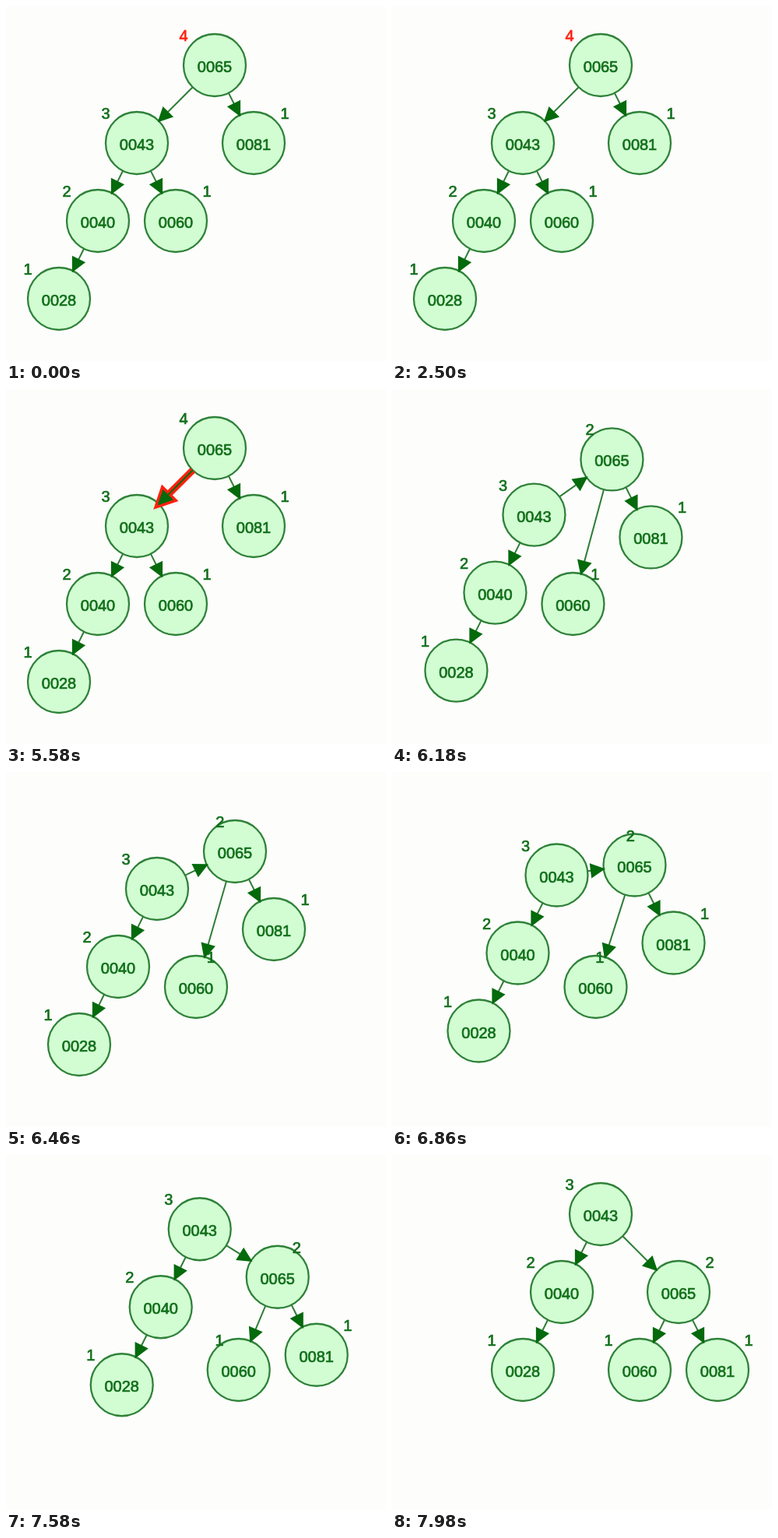
Write an HTML page with a canvas that moves like this. It is 488x456 px and loops after 8000 ms.

```html
<!DOCTYPE html>
<html lang="en">
<head>
<meta charset="utf-8">
<title>Tree rotation</title>
<style>
html, body { margin: 0; width: 100%; height: 100%; overflow: hidden; background: #fdfdfc; }
canvas { display: block; }
</style>
</head>
<body>
<canvas id="stage" width="488" height="456"></canvas>
<script>
const ctx = document.getElementById("stage").getContext("2d");
const LOOP = 8000, RADIUS = 40;
const PAPER = "#fdfdfc", FILL = "#d2fdd3", RING = "#2f8238", LINE = "#2f7d36", DARK = "#046a0c", INK = "#126f1a", RED = "#ff2010";
const HIGHLIGHT = 57, ROTATE = 126;

// side: -1 puts the height label on the left, 1 on the right (before and after the move)
const nodes = {
  65: { from: [268, 76], to: [368, 176], side: [-1, 1], height: 4 },
  43: { from: [168, 176], to: [268, 76], side: [-1, -1], height: 3 },
  81: { from: [318, 176], to: [418, 276], side: [1, 1], height: 1 },
  40: { from: [118, 276], to: [218, 176], side: [-1, -1], height: 2 },
  60: { from: [218, 276], to: [318, 276], side: [1, -1], height: 1 },
  28: { from: [68, 376], to: [168, 276], side: [-1, -1], height: 1 }
};
const edgesBefore = [[65, 43], [65, 81], [43, 40], [43, 60], [40, 28]];
const edgesAfter = [[43, 65], [65, 81], [43, 40], [65, 60], [40, 28]];
const moveKeys = [[126.5, 0], [140, 0.26], [156, 0.61], [161, 0.735], [172, 1]];

const mix = (a, b, p) => a + (b - a) * p;

// Steps come in threes, lasting 20, 20 and 100 ms.
function stepAt(ms) {
  const s = ms + 20;
  return 3 * Math.floor(s / 140) + Math.min(2, Math.floor((s % 140) / 20));
}

function progressAt(step) {
  if (step <= moveKeys[0][0]) return 0;
  for (let i = 1; i < moveKeys.length; i++) {
    const [a, pa] = moveKeys[i - 1], [b, pb] = moveKeys[i];
    if (step <= b) return mix(pa, pb, (step - a) / (b - a));
  }
  return 1;
}

// Triangle wave between 6 and 14 px
function pulseWidth(step) {
  const phase = (((step - 85.5) * 1.33) % 56 + 56) % 56;
  return 6 + Math.min(phase, 56 - phase) * 2 / 7;
}

function drawArrow(a, b, width, lineColor, headColor) {
  const tip = Math.hypot(b[0] - a[0], b[1] - a[1]) - RADIUS;
  ctx.save();
  ctx.translate(a[0], a[1]);
  ctx.rotate(Math.atan2(b[1] - a[1], b[0] - a[0]));
  ctx.lineWidth = width;
  ctx.strokeStyle = lineColor;
  ctx.beginPath();
  ctx.moveTo(RADIUS, 0);
  ctx.lineTo(tip, 0);
  ctx.stroke();
  ctx.strokeStyle = ctx.fillStyle = headColor;
  ctx.beginPath();
  ctx.moveTo(tip, 0);
  ctx.lineTo(tip - 16, -8);
  ctx.lineTo(tip - 16, 8);
  ctx.closePath();
  ctx.fill();
  ctx.stroke();
  ctx.restore();
}

function drawText(text, x, y, color) {
  ctx.fillStyle = ctx.strokeStyle = color;
  ctx.lineWidth = 0.7;
  ctx.fillText(text, x, y);
  ctx.strokeText(text, x, y);
}

function draw(ms) {
  const step = stepAt(ms);
  const p = progressAt(step);
  const rotated = step >= ROTATE;
  const lit = step >= HIGHLIGHT && !rotated;
  const place = key => nodes[key].from.map((v, i) => mix(v, nodes[key].to[i], p));

  ctx.fillStyle = PAPER;
  ctx.fillRect(0, 0, 488, 456);
  ctx.font = '20px "Liberation Sans", Arial, sans-serif';
  ctx.textAlign = "center";
  ctx.textBaseline = "alphabetic";

  for (const key in nodes) {
    const [x, y] = place(key);
    ctx.beginPath();
    ctx.arc(x, y, RADIUS, 0, 2 * Math.PI);
    ctx.fillStyle = FILL;
    ctx.fill();
    ctx.strokeStyle = RING;
    ctx.lineWidth = 2.3;
    ctx.stroke();
    drawText(key.padStart(4, "0"), x, y + 9, INK);
  }

  (rotated ? edgesAfter : edgesBefore).forEach(([a, b], i) => {
    const marked = lit && i === 0;
    if (marked) drawArrow(place(a), place(b), pulseWidth(step), RED, RED);
    drawArrow(place(a), place(b), 2, marked ? DARK : LINE, DARK);
  });

  for (const key in nodes) {
    const { side, height } = nodes[key];
    const [x, y] = place(key);
    const isRoot = key === "65";
    const color = isRoot && step < HIGHLIGHT ? RED : INK;
    drawText(isRoot && rotated ? 2 : height, x + mix(side[0], side[1], p) * 40, y - 31, color);
  }
}

const start = performance.now();
function tick() {
  draw((performance.now() - start) % LOOP);
  requestAnimationFrame(tick);
}
tick();
</script>
</body>
</html>
```
